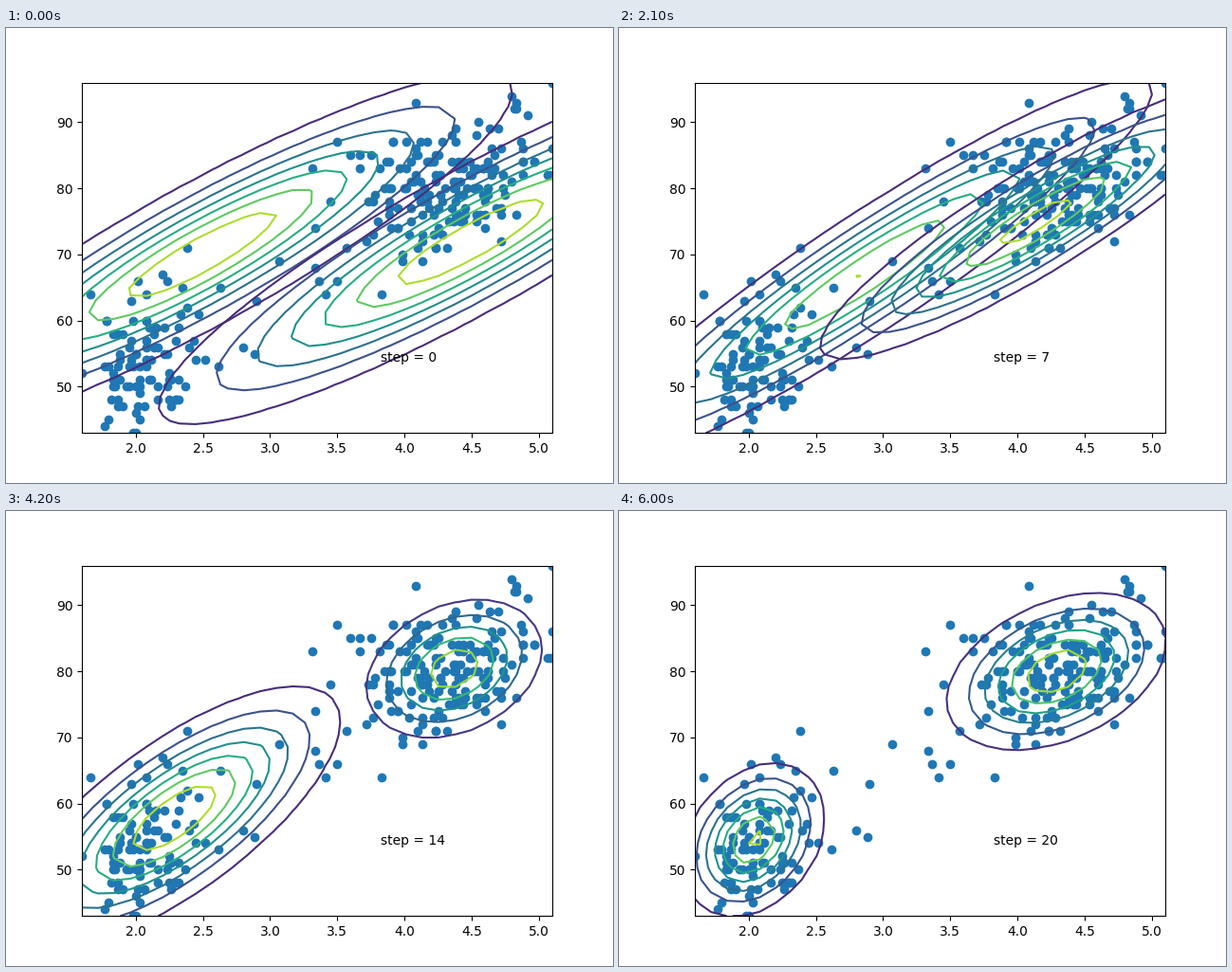
A matplotlib script for the animation above (6.3 s loop, 640 by 480 pixels).

```python
import numpy as np
import matplotlib.pyplot as plt
from matplotlib.animation import FuncAnimation

STEPS = 21
X_RANGE, Y_RANGE = (1.6, 5.1), (43, 96)
WEIGHTS = np.array([.356, .644])

# Key poses of each Gaussian: mean x, mean y, sigma x, sigma y, correlation
KEY_STEPS = np.array([2, 7, 9, 12, 16, 20])
LEFT = np.array([
    (3.068, 70.13, 1.096, 14.42, .945),
    (2.866, 66.95, 1.081, 14.96, .9375),
    (2.715, 64.50, 1.02, 14.30, .925),
    (2.482, 60.67, .808, 12.60, .877),
    (2.122, 55.50, .4155, 7.00, .5685),
    (2.036, 54.48, .263, 5.805, .285),
])
RIGHT = np.array([
    (3.90, 71.65, 1.024, 12.72, .948),
    (4.134, 74.95, .80, 10.38, .904),
    (4.30, 78.60, .52, 7.80, .80),
    (4.402, 80.15, .3216, 5.46, .35),
    (4.324, 80.36, .382, 5.74, .305),
    (4.290, 79.97, .412, 6.00, .378),
])

# Lone points between and around the two groups
LONE = [
    (3.33, 74), (2.88, 55), (2.8, 56), (3.07, 69), (2.9, 63), (3.32, 83),
    (3.5, 87), (3.6, 85), (3.33, 68), (3.37, 66), (3.42, 64), (3.5, 66),
    (3.45, 78), (3.57, 71), (3.83, 64), (2.63, 65), (2.62, 53), (2.38, 71),
    (1.67, 64), (1.6, 52), (1.98, 43), (4.08, 93), (4.8, 94), (5.1, 96),
]


def cluster(rng, n, pose, x_min, reach=2.2):
    """Normal samples kept inside an ellipse and right of x_min."""
    mx, my, sx, sy, rho = pose
    u, v = rng.normal(size=(2, 4 * n))
    x = mx + sx * u
    y = my + sy * (rho * u + np.sqrt(1 - rho**2) * v)
    keep = (np.hypot(u, v) < reach) & (x > x_min)
    return np.column_stack([x, y])[keep][:n]


def first_poses():
    """Both start with the overall spread, one unit either side of the mean."""
    ends = np.array([LEFT[-1], RIGHT[-1]])
    mean = WEIGHTS @ ends[:, :2]
    dx, dy = (ends[:, :2] - mean).T
    sx, sy, rho = ends[:, 2:].T
    var_x = WEIGHTS @ (sx**2 + dx**2)
    var_y = WEIGHTS @ (sy**2 + dy**2)
    cov = WEIGHTS @ (rho * sx * sy + dx * dy)
    spread = np.sqrt(var_x), np.sqrt(var_y), cov / np.sqrt(var_x * var_y)
    return [(*(mean + shift), *spread) for shift in (-1, 1)]


def glide(keys, step):
    """Smooth path through the key poses, at rest at both ends."""
    t = KEY_STEPS
    step = max(step, t[0])
    rate = np.diff(keys, axis=0) / np.diff(t)[:, None]
    slope = np.gradient(keys, t, axis=0)
    slope[1:-1][rate[:-1] * rate[1:] < 0] = 0
    slope[[0, -1]] = 0
    i = min(np.searchsorted(t, step, side="right"), len(t) - 1) - 1
    h = t[i + 1] - t[i]
    s = (step - t[i]) / h
    ease = s * s * (3 - 2 * s)
    return (keys[i] * (1 - ease) + keys[i + 1] * ease
            + h * s * (1 - s) * ((1 - s) * slope[i] - s * slope[i + 1]))


def density(mx, my, sx, sy, rho):
    u, v = (gx - mx) / sx, (gy - my) / sy
    q = 1 - rho**2
    dist = (u * u + v * v - 2 * rho * u * v) / q
    return np.exp(-dist / 2) / (2 * np.pi * sx * sy * np.sqrt(q))


gx, gy = np.meshgrid(np.linspace(*X_RANGE, 30), np.linspace(*Y_RANGE, 30))

rng = np.random.default_rng(4)
points = np.vstack([LONE,
                    cluster(rng, 88, LEFT[-1], 1.73),
                    cluster(rng, 160, RIGHT[-1], 3.65)])
# Times were noted to the second, waits to the minute
x, y = np.round(points[:, 0] * 60) / 60, np.round(points[:, 1])

fig, ax = plt.subplots(figsize=(6.4, 4.8), dpi=100)
ax.scatter(x, y, color="C0")
label = ax.text(3.82, 53.75, "")
rings = []


def update(step):
    while rings:
        rings.pop().remove()
    poses = [glide(k, step) for k in (LEFT, RIGHT)] if step else first_poses()
    rings.extend(ax.contour(gx, gy, density(*p)) for p in poses)
    ax.set(xlim=X_RANGE, ylim=Y_RANGE)
    label.set_text(f"step = {step}")
    return [*rings, label]


anim = FuncAnimation(fig, update, frames=STEPS, interval=300,
                     repeat=True, repeat_delay=0, blit=False)
plt.show()
```
